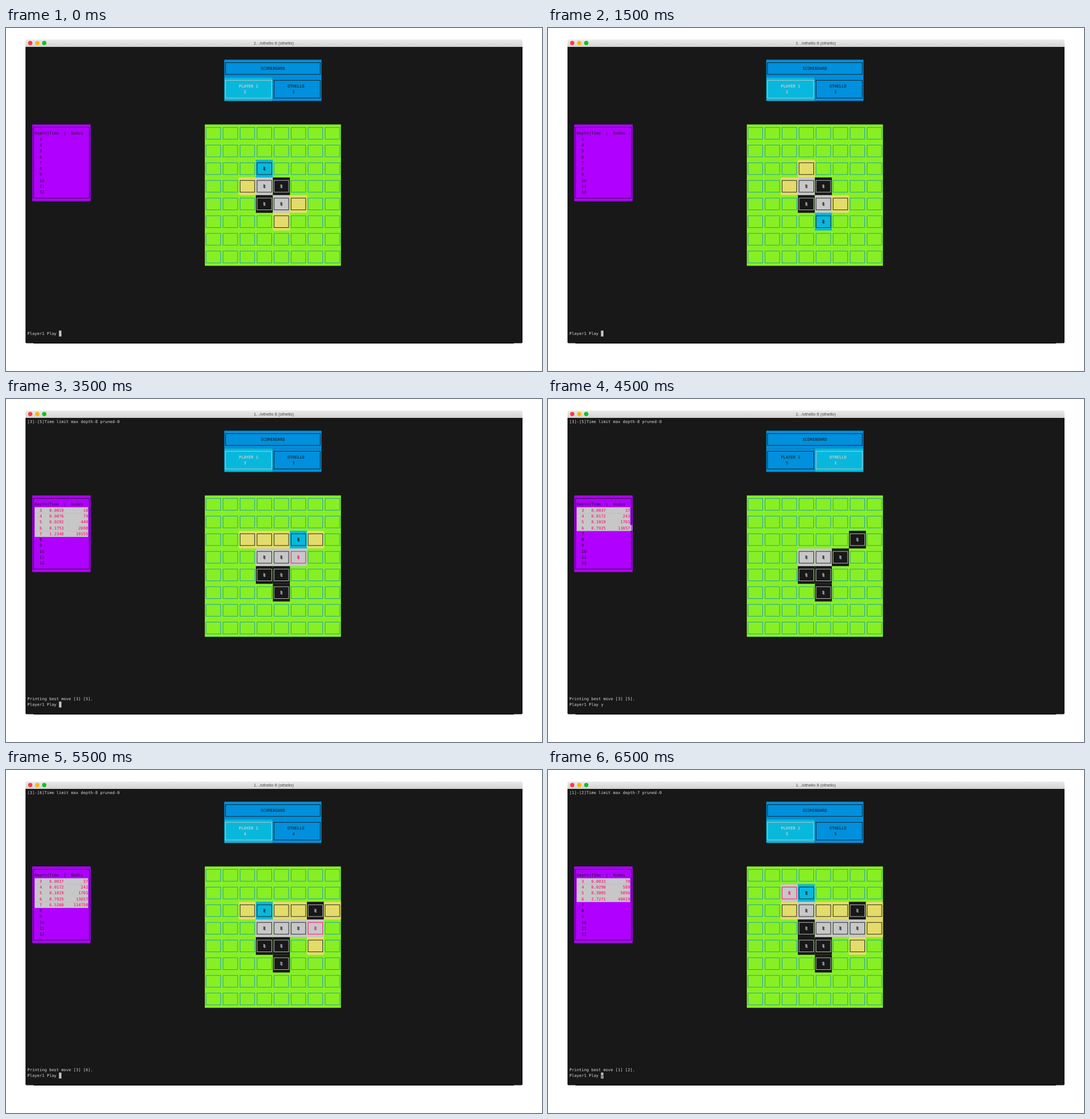
An HTML page that plays this animation: 935 by 599 pixels, repeating every 7000 ms.

```html
<!DOCTYPE html>
<html lang="en">
<head>
<meta charset="utf-8">
<title>Othello in a terminal</title>
<style>
  html, body { margin: 0; width: 100%; height: 100%; overflow: hidden; background: #fff; }
  svg { display: block; width: 100vw; height: 100vh; }
  text { white-space: pre; }
  .term { font: 7.04px "DejaVu Sans Mono", monospace; }
  .bold { font-weight: bold; }
  .title { font: 7.5px "Liberation Sans", Arial, sans-serif; fill: #484848; text-anchor: middle; }
</style>
</head>
<body>
<svg viewBox="0 0 935 599">
  <defs>
    <linearGradient id="bar" x2="0" y2="1">
      <stop stop-color="#ebebeb"/><stop offset="1" stop-color="#d2d2d2"/>
    </linearGradient>
  </defs>
  <path d="M34 33V23q0-3 3-3H898q3 0 3 3V33Z" fill="url(#bar)"/>
  <circle cx="42.3" cy="26.3" r="3.7" fill="#fc3b3c"/>
  <circle cx="54.6" cy="26.3" r="3.7" fill="#fdb40a"/>
  <circle cx="66.7" cy="26.3" r="3.7" fill="#14c022"/>
  <text class="title" x="467" y="29">1. ./othello 8 (othello)</text>
  <path d="M34 33H901V548.5q0 2-2 2H36q-2 0-2-2Z" fill="#181818"/>
  <path d="M48 550.5H886" stroke="#000"/>
  <g id="screen"></g>
</svg>
<script>
const STEP = 500;
const CW = 4.24, RH = 10.285, X0 = 37.3, Y0 = 34.76;
const C = {
  dark: '#181818', light: '#c7c7c7', green: '#88ef24', blue: '#0090dd', cyan: '#08b8dc',
  yellow: '#e3dc6b', purple: '#b000ff', pink: '#ff0068'
};

const list = s => s ? s.split(' ') : [];
const phase = (white, black, hints, last, best, depth, rows) => ({
  white: list(white), black: list(black), hints: list(hints), last, best, depth, rows
});

const search1 = ['0.0019 18', '0.0076 79', '0.0292 440', '0.1753 2698', '1.2348 19155'];
const search2 = ['0.0037 37', '0.0172 241', '0.1019 1701', '0.7925 13657', '6.5268 114750'];
const search3 = ['0.0033 70', '0.0298 589', '0.3005 5056', '2.7271 49019'];

const opening = phase('33 44', '34 43', '23 32 45 54', '', '', 0, []);
const reply1 = phase('33 34 35', '43 44 54', '22 23 24 25 26', '35', '35', 8, search1);
const think2 = phase('33 34', '26 35 43 44 54', '', '', '35', 8, search2.slice(0, 4));
const reply2 = phase('33 34 35 36', '26 43 44 54', '22 23 24 25 27 46', '36', '36', 8, search2);
const think3 = phase('34 35 36', '23 26 33 43 44 54', '', '', '36', 8, search3);
const reply3 = phase('12 23 34 35 36', '26 33 43 44 54', '13 22 24 25 27 37 46', '12', '12', 7, search3);

// Each entry: position on the board and which hint the player has selected
const steps = [
  ...[0, 1, 2, 3].map(i => [opening, i]),
  ...[0, 1, 2, 3, 4].map(i => [reply1, i]),
  [think2, -1], [reply2, 0], [reply2, 1], [think3, -1], [reply3, 0]
];

const px = col => X0 + col * CW;
const py = row => Y0 + row * RH;

function fill(col, row, w, h, color) {
  return `<rect x="${px(col)}" y="${py(row)}" width="${w * CW}" height="${h * RH}" fill="${color}"/>`;
}

// Box-drawing border: the line runs through the centres of the outer characters
function frame(col, row, w, h, color) {
  return `<rect x="${px(col + .5)}" y="${py(row + .5)}" width="${(w - 1) * CW}" ` +
    `height="${(h - 1) * RH}" fill="none" stroke="${color}" stroke-width=".9"/>`;
}

function box(col, row, w, h, bg, line) {
  return fill(col, row, w, h, bg) + frame(col, row, w, h, line);
}

function text(col, row, str, color, cls = '') {
  return `<text class="term ${cls}" x="${px(col)}" y="${py(row) + 7.7}" fill="${color}">${str}</text>`;
}

function disc(col, row, color) {
  const x = px(col + 3.5), y = py(row + 1.5);
  const wave = dy => `M${x - 1.7} ${y + dy}q.9-1.3 1.7 0t1.7 0`;
  return `<path d="${[-2.1, 0, 2.1].map(wave).join('')}" fill="none" stroke="${color}" stroke-width="1.1"/>`;
}

function cell(r, c, p, chosen) {
  const id = `${r}${c}`, col = 73 + c * 7, row = 13 + r * 3;
  const draw = (bg, line, mark) => box(col, row, 7, 3, bg, line) + (mark ? disc(col, row, mark) : '');
  if (id === chosen) return draw(C.cyan, C.dark, C.dark);
  if (id === p.last) return draw(C.light, C.pink, C.pink);
  if (p.white.includes(id)) return draw(C.light, C.dark, C.dark);
  if (p.black.includes(id)) return draw(C.dark, C.light, C.light);
  if (p.hints.includes(id)) return draw(C.yellow, C.dark);
  return frame(col, row, 7, 3, '#1898b8');
}

function board(p, chosen) {
  let out = fill(73, 13, 56, 24, C.green);
  for (let r = 0; r < 8; r++)
    for (let c = 0; c < 8; c++) out += cell(r, c, p, chosen);
  return out;
}

function player(col, name, score, active) {
  const ink = active ? C.light : C.dark, cls = active ? 'bold' : '';
  return box(col, 5, 20, 4, active ? C.cyan : C.blue, ink) +
    text(col + 6, 6, name, ink, cls) + text(col + 8, 7, score, ink, cls);
}

function scoreboard(p, thinking) {
  return box(81, 2, 40, 3, C.blue, C.dark) + text(96, 3, 'SCOREBOARD', C.dark) +
    player(81, 'PLAYER 1', p.black.length, !thinking) +
    player(101, 'OTHELLO', p.white.length, thinking);
}

function searchTable(p, thinking) {
  let out = fill(2, 13, 24, 13, C.purple);
  if (thinking) out += fill(25, 14 + p.rows.length, .85, 1, '#e6e6e6');
  out += frame(2, 13, 24, 13, C.dark) + text(3, 14, 'Depth|Time  |  Nodes', C.dark);
  for (let i = 0; i < 10; i++) {
    const row = 15 + i, done = p.rows[i];
    if (done) {
      const [time, nodes] = done.split(' ');
      out += fill(3, row, 22, 1.04, C.light) + text(9, row, time, C.pink) +
        text(25 - nodes.length, row, nodes, C.pink);
    }
    out += text(5, row, i + 3, done ? C.pink : C.dark);
  }
  return out;
}

function prompt(p, pick) {
  const thinking = pick < 0;
  let out = text(0, 48, 'Player1 Play', '#d6d6d6');
  if (p.best) {
    const [r, c] = p.best;
    out += text(0, 0, `[${r}]-[${c}]Time limit max depth-${p.depth} pruned-0`, '#d6d6d6') +
      text(0, 47, `Printing best move [${r}] [${c}].`, '#d6d6d6');
  }
  if (!thinking) out += fill(13, 48, 1, 1, C.light);
  if (thinking || (p.best && pick === 0)) out += text(13, 48, 'y', thinking ? '#d6d6d6' : C.dark);
  return out;
}

const screen = document.getElementById('screen');
let shown = -1;

function render(ms) {
  const n = Math.floor(ms / STEP) % steps.length;
  if (n === shown) return;
  shown = n;
  const [p, pick] = steps[n], thinking = pick < 0;
  screen.innerHTML = scoreboard(p, thinking) + searchTable(p, thinking) +
    board(p, p.hints[pick]) + prompt(p, pick);
}

const start = performance.now();
function tick() {
  render(performance.now() - start);
  requestAnimationFrame(tick);
}
tick();
</script>
</body>
</html>
```
